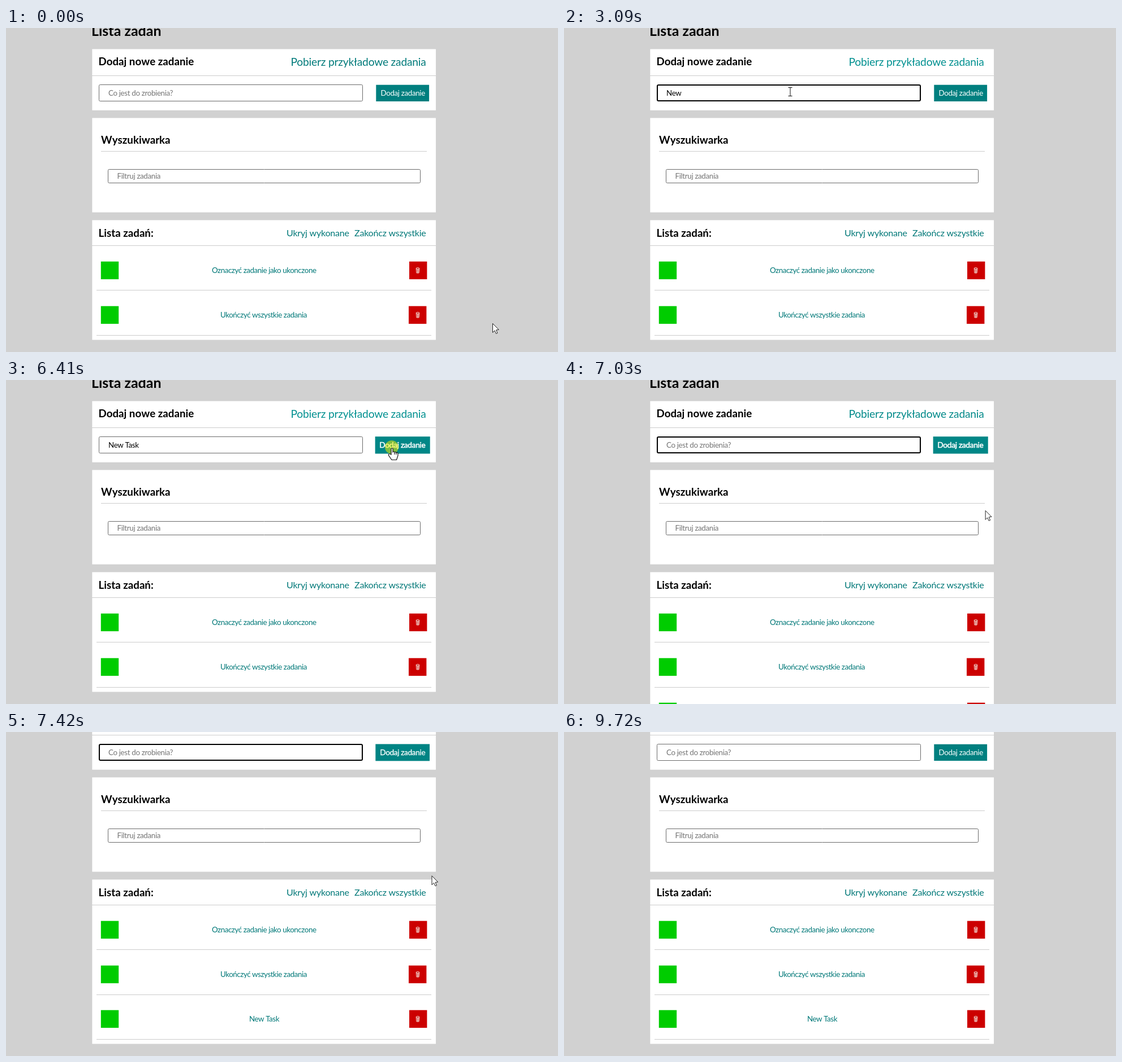
An HTML page with a canvas for the animation above (9810 ms loop, 976x574 px).

```html
<!DOCTYPE html>
<html lang="pl">
<head>
<meta charset="utf-8">
<title>Lista zadań</title>
<style>
  html, body { margin: 0; width: 100%; height: 100%; overflow: hidden; background: #d1d1d1; }
  canvas { display: block; width: 976px; height: 574px; }
</style>
</head>
<body>
<canvas id="stage" width="976" height="574"></canvas>
<script>
const ctx = document.getElementById('stage').getContext('2d');
const LOOP = 9810, BLINK = 540, ROW = 79;
const TEAL = '#007878';
const ADDED = 6500;

// Font, letter spacing and kerning of each kind of text.
const STYLES = {
  title: ['700 25px', 0, 'none'],
  heading: ['700 18.72px', 0, 'none'],
  big: ['400 19.2px', -0.19, 'auto'],
  link: ['400 16px', -0.2, 'auto'],
  small: ['400 13.333px', -0.33, 'auto'],
  task: ['400 13.333px', -0.42, 'auto']
};

// Time of each key press in the input field.
const KEYS = [1990, 2310, 2540, 3390, 3940, 4170, 4400, 4480];
const TYPED = 'New Task';

const clamp = v => Math.max(0, Math.min(1, v));
const ramp = (t, a, b) => clamp((t - a) / (b - a));
const smooth = v => v * v * (3 - 2 * v);
const ease = (t, a, b) => smooth(ramp(t, a, b));

function box(x, y, w, h, color) {
  ctx.fillStyle = color;
  ctx.fillRect(x, y, w, h);
}

const panel = (top, bottom) => box(152.4, top, 607.6, bottom - top, '#fff');
const rule = (x, y, w) => box(x, y, w, 1, '#ccc');

function label(text, x, y, style, color) {
  const [font, spacing, kerning] = STYLES[style];
  ctx.font = font + ' Lato, sans-serif';
  ctx.letterSpacing = spacing + 'px';
  ctx.fontKerning = kerning;
  ctx.fillStyle = color;
  ctx.fillText(text, x, y);
}

function field(x, y, w, h, focused) {
  const line = focused ? 2 : 1;
  ctx.beginPath();
  ctx.roundRect(x + line / 2, y + line / 2, w - line, h - line, 2);
  ctx.fillStyle = '#fff';
  ctx.fill();
  ctx.lineWidth = line;
  ctx.strokeStyle = focused ? '#000' : '#6a6a6a';
  ctx.stroke();
}

function polygon(points, fill, stroke, width) {
  ctx.beginPath();
  points.forEach(([x, y]) => ctx.lineTo(x, y));
  ctx.closePath();
  ctx.fillStyle = fill;
  ctx.fill();
  ctx.strokeStyle = stroke;
  ctx.lineWidth = width;
  ctx.stroke();
}

function bin(x, y) {
  ctx.strokeStyle = '#f4e4dc';
  ctx.lineWidth = 1;
  ctx.beginPath();
  ctx.ellipse(x, y - 3.5, 3, 1.3, 0, 0, 7);
  ctx.moveTo(x - 2.7, y - 3);
  ctx.lineTo(x - 2, y + 4.5);
  ctx.lineTo(x + 2, y + 4.5);
  ctx.lineTo(x + 2.7, y - 3);
  ctx.moveTo(x - 0.5, y - 2);
  ctx.lineTo(x - 0.5, y + 4);
  ctx.moveTo(x + 1, y - 2);
  ctx.lineTo(x + 1, y + 4);
  ctx.stroke();
}

function task(index, text, x, redX) {
  const y = 413.7 + index * ROW;
  box(167.8, y, 31.4, 31.4, '#0c0');
  box(redX, y, 31.4, 31.4, '#c00');
  bin(728, y + 15.8);
  label(text, x, y + 20.3, 'task', TEAL);
  rule(160, 464 + index * 80 - (index > 1 ? 1 : 0), 592);
}

function inputState(t) {
  const count = KEYS.filter(k => k <= t).length;
  const text = t < ADDED ? TYPED.slice(0, count) : '';
  const focused = (t >= 520 && t < 6330) || (t >= ADDED && t < 9720);
  let since = 760;
  if (count) since = KEYS[count - 1];
  if (t >= ADDED) since = 6410;
  const caret = focused && (t < since || Math.floor((t - since) / BLINK) % 2 === 0);
  return { text, focused, caret };
}

function addButton(hover) {
  ctx.save();
  ctx.translate(701.2, 115.5);
  ctx.scale(1 + 0.035 * hover, 1 + 0.035 * hover);
  box(-46.9, -14.8, 93.8, 29.3, `rgb(0, ${127 + 8 * hover}, ${127 + 8 * hover})`);
  const x = -38.7 - 0.8 * hover;
  label('Dodaj zadanie', x, 4.5, 'small', '#fff');
  if (hover > 0) {
    ctx.lineWidth = 0.5 * hover;
    ctx.strokeStyle = '#fff';
    ctx.strokeText('Dodaj zadanie', x, 4.5);
  }
  ctx.restore();
}

function page(t) {
  const { text, focused, caret } = inputState(t);
  const glow = 22 * ease(t, 330, 750) - 10 * ease(t, 6640, 7250);
  const tone = Math.round(122 + glow);

  label('Lista zadań', 151, 14, 'title', '#000');

  panel(37.4, 145.8);
  rule(152, 84, 608);
  label('Dodaj nowe zadanie', 163.5, 66, 'heading', '#000');
  label('Pobierz przykładowe zadania', 503.5, 67, 'big', `rgb(0, ${tone}, ${tone})`);
  field(164, 100, 467, 30, focused);
  if (text) label(text, 181, 120, 'small', '#000');
  else label('Co jest do zrobienia?', 181, 120, 'small', '#757575');
  if (caret) box(181 + Math.round(text ? ctx.measureText(text).width : 0), 109, 1, 13, '#000');
  addButton(ease(t, 6080, 6300) - ramp(t, 7250, 7660));

  panel(159.4, 326.6);
  label('Wyszukiwarka', 168, 205, 'heading', '#000');
  rule(168, 218, 576);
  field(180, 250, 553, 25, false);
  label('Filtruj zadania', 196.5, 267, 'small', '#757575');

  const added = t >= ADDED;
  panel(340.4, 552.5 + (added ? ROW : 0));
  label('Lista zadań:', 163.5, 369.5, 'heading', '#000');
  label('Ukryj wykonane', 496, 369, 'link', TEAL);
  label('Zakończ wszystkie', 616, 369, 'link', TEAL);
  rule(152, 385, 608);
  task(0, 'Oznaczyć zadanie jako ukonczone', 364, 713);
  task(1, 'Ukończyć wszystkie zadania', 379, 712);
  if (added) task(2, 'New Task', 430, 713);
}

// Mouse path: start, end, from, control point, to.
const MOVES = [
  [70, 600, [860, 523], [640, -40], [400, 113]],
  [5600, 6260, [400, 113], [560, 135], [682, 119]],
  [6680, 7150, [682, 119], [730, 180], [752.5, 254.3]],
  [7690, 8650, [752.5, 254.3], [860, 320], [517, 484]]
];

function pointer(t) {
  let move = MOVES[0];
  for (const m of MOVES) if (t >= m[0]) move = m;
  const [start, end, a, c, b] = move;
  const k = ease(t, start, end);
  return [0, 1].map(i => a[i] * (1 - k) ** 2 + 2 * c[i] * k * (1 - k) + b[i] * k * k);
}

function arrow() {
  polygon([[0.5, 0.5], [0.5, 16.5], [4, 13], [6.5, 18.5], [9, 17.4], [6.6, 12], [11.3, 11.5]],
    '#fff', '#222', 1);
}

function hand() {
  ctx.beginPath();
  ctx.moveTo(-1, 13);
  ctx.lineTo(-1, 3);
  ctx.quadraticCurveTo(0.5, 0, 2, 3);
  ctx.lineTo(2, 8.5);
  for (let i = 0; i < 3; i++) {
    const x = 2 + i * 3;
    ctx.quadraticCurveTo(x + 1.6, 6.8 + i * 0.8, x + 3, 9 + i);
  }
  ctx.lineTo(11, 15);
  ctx.lineTo(8.5, 22.5);
  ctx.lineTo(0, 22.5);
  ctx.lineTo(-5.5, 14.5);
  ctx.quadraticCurveTo(-6, 11, -3, 12);
  ctx.closePath();
  ctx.fillStyle = '#fff';
  ctx.fill();
  ctx.strokeStyle = '#111';
  ctx.lineWidth = 1.2;
  ctx.moveTo(5, 9);
  ctx.lineTo(5, 13);
  ctx.moveTo(8, 10);
  ctx.lineTo(8, 13);
  ctx.stroke();
}

function beam() {
  ctx.strokeStyle = '#111';
  ctx.lineWidth = 1;
  ctx.beginPath();
  for (const y of [-7.5, 7.5]) {
    ctx.moveTo(-3.5, y);
    ctx.lineTo(3.5, y);
  }
  ctx.moveTo(0, -7.5);
  ctx.lineTo(0, 7.5);
  ctx.stroke();
}

function cursorShape(x, y, scroll) {
  const inside = (l, top, r, bottom) =>
    x >= l && x <= r && y + scroll >= top && y + scroll <= bottom;
  if (inside(164, 100, 631, 130) || inside(180, 250, 733, 275)) return beam;
  if (inside(654, 100, 749, 130) || inside(504, 50, 743, 74)) return hand;
  if (inside(496, 352, 743, 374)) return hand;
  return arrow;
}

function cursor(t, scroll) {
  if (t >= 8730) return;
  const [x, y] = pointer(t);
  for (const [start, end] of [[520, 860], [6330, 6640]]) {
    if (t < start || t >= end) continue;
    ctx.fillStyle = `rgba(245, 240, 0, ${0.52 * (1 - ramp(t, end - 140, end))})`;
    ctx.beginPath();
    ctx.arc(x, y, 12, 0, 7);
    ctx.fill();
  }
  ctx.save();
  ctx.translate(x, y);
  cursorShape(x, y, scroll)();
  ctx.restore();
}

function draw() {
  const t = performance.now() % LOOP;
  const scroll = Math.round(ROW * ease(t, 7183, 7400));
  box(0, 0, 976, 574, '#d1d1d1');
  ctx.save();
  ctx.translate(0, -scroll);
  page(t);
  ctx.restore();
  cursor(t, scroll);
  requestAnimationFrame(draw);
}
draw();
</script>
</body>
</html>
```
